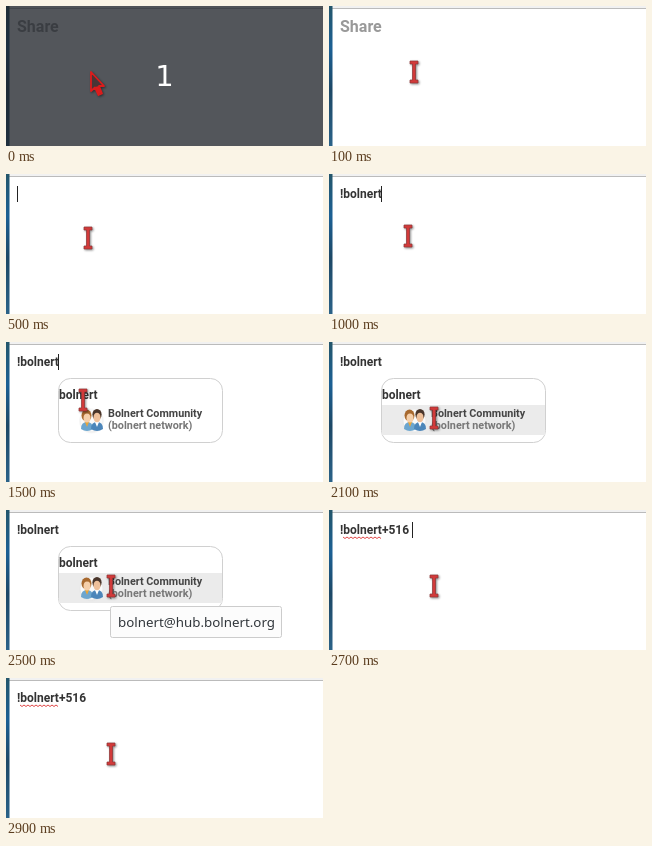
An HTML page for the animation above (3600 ms loop, 317 px wide and 140 px high).

```html
<!DOCTYPE html>
<html lang="en">
<head>
<meta charset="utf-8">
<style>
  html, body { margin: 0; width: 100%; height: 100%; overflow: hidden; background: #fff; }
  svg { display: block; width: 317px; height: 140px; }
  text { font: 700 12px Roboto, sans-serif; fill: #333; }
  #placeholder { font-size: 16px; fill: #999; }
  .result { font-size: 10.8px; fill: #444; }
  .result.sub { fill: #777; }
  #tooltip text { font: 13.33px "Noto Sans", sans-serif; fill: #31363b; }
  #countdown text { font: 29px "DejaVu Sans", sans-serif; fill: #fff; text-anchor: middle; }
  .shadow { filter: drop-shadow(1px 1px 1px #0007); }
</style>
</head>
<body>
<svg viewBox="0 0 317 140">
  <defs>
    <linearGradient id="desktop" x2="0" y2="1">
      <stop stop-color="#24566b"/>
      <stop offset=".3" stop-color="#1c6094"/>
      <stop offset=".6" stop-color="#1d4866"/>
      <stop offset="1" stop-color="#2b6288"/>
    </linearGradient>
    <radialGradient id="glow">
      <stop offset=".75" stop-color="#e4e4e4"/>
      <stop offset="1" stop-color="#e4e4e4" stop-opacity="0"/>
    </radialGradient>
  </defs>

  <rect width="317" height="140" fill="#fff"/>
  <rect width="317" height="2" fill="#f1f1f1"/>
  <rect y="2" width="317" height="1" fill="#bbb"/>
  <rect width="3.5" height="140" fill="url(#desktop)"/>

  <text id="placeholder" x="11" y="25.5">Share</text>
  <text id="typed" x="11" y="24"></text>
  <path id="squiggle" fill="none" stroke="#d33" stroke-width=".9"/>
  <rect id="caret" y="12" width="1" height="16" fill="#222"/>

  <g id="popup">
    <rect x="52.5" y="36.5" width="164" height="64" rx="12" fill="#fff" stroke="#d0d0d0"/>
    <rect id="highlight" x="53" y="63" width="163" height="30" fill="#ebebeb"/>
    <text x="53" y="57">bolnert</text>
    <circle cx="85.5" cy="79" r="13" fill="url(#glow)"/>
    <circle cx="85.5" cy="78.5" r="11" fill="#fafafa"/>
    <g id="avatar">
      <path d="M75 87q0-7 6-7t6 7q-6 4-12 0" fill="#6ca6cf"/>
      <path d="M85 87q0-7 6-7t6 7q-6 4-12 0" fill="#4c86ba"/>
      <path d="M79 80l2 5 2-5z" fill="#e8a63c"/>
      <path d="M89 80l2 5 2-5z" fill="#fff"/>
      <ellipse cx="80.5" cy="73.5" rx="5" ry="6" fill="#a8692e"/>
      <ellipse cx="91" cy="72.5" rx="4.6" ry="5.5" fill="#49352a"/>
      <ellipse cx="81" cy="76" rx="3.5" ry="4.5" fill="#f5cfaa"/>
      <ellipse cx="91" cy="75.5" rx="3.5" ry="4.8" fill="#efc09a"/>
    </g>
    <text class="result" x="102" y="75">Bolnert Community</text>
    <text class="result sub" x="102" y="87">(bolnert network)</text>
  </g>

  <g id="tooltip">
    <rect x="104.5" y="96.5" width="171" height="31" rx="2" fill="#fcfcfc" stroke="#ccc"/>
    <text x="112" y="117">bolnert@hub.bolnert.org</text>
  </g>

  <g id="countdown">
    <rect width="317" height="140" fill="rgb(30,33,40)" fill-opacity=".76"/>
    <text x="158.5" y="80">1</text>
  </g>

  <g id="arrow" class="shadow">
    <path d="M1 1V20L5 16.5 8.5 24 12 22.5 9 15H14Z" fill="#4b3536" stroke="#dc1c1c" stroke-width="1.8" stroke-linejoin="round"/>
    <path d="M5 16L9 15 12 22 8.5 23.5Z" fill="#dc1c1c"/>
  </g>
  <g id="beam" class="shadow">
    <path d="M-4-11H4V-8H1.5V8H4V11H-4V8H-1.5V-8H-4Z" fill="#d23a3a" stroke="#8e3535" stroke-width=".7"/>
  </g>
</svg>
<script>
const LOOP = 3600;
const el = id => document.getElementById(id);
const show = (id, on) => { el(id).style.display = on ? "" : "none"; };
const latest = (steps, t) => steps.findLast(step => step[0] <= t);

// [start, pointer, x, y]
const pointerSteps = [
  [0, "arrow", 84, 65], [100, "beam", 85, 66],
  [500, "beam", 82, 64], [600, "beam", 79, 62],
  [1500, "beam", 77, 58], [1700, "arrow", 80, 65],
  [1800, "arrow", 85, 70], [1900, "arrow", 91, 72],
  [2000, "arrow", 97, 73], [2100, "beam", 105, 76]
];
// [start, text, caret x]
const typedSteps = [
  [0, "", 0], [500, "", 11], [1000, "!bolnert", 52], [1700, "!bolnert", 0],
  [2700, "!bolnert+516", 83], [2900, "!bolnert+516", 0]
];

let wave = "M14 27";
for (let x = 16; x <= 52; x += 2) wave += `L${x} ${x % 4 ? 27 : 28.5}`;
el("squiggle").setAttribute("d", wave);

function draw(now) {
  const t = now % LOOP;
  const within = (from, to) => t >= from && t < to;

  const [, pointer, x, y] = latest(pointerSteps, t);
  show("arrow", pointer === "arrow");
  show("beam", pointer === "beam");
  el(pointer).setAttribute("transform", `translate(${x} ${y})`);

  const [, text, caretX] = latest(typedSteps, t);
  el("typed").textContent = text;
  el("caret").setAttribute("x", caretX);
  show("caret", caretX > 0);

  show("countdown", t < 100);
  show("placeholder", t < 500);
  show("popup", within(1100, 2700));
  show("highlight", within(1700, 2700));
  show("tooltip", within(2500, 2700));
  show("squiggle", t >= 2700);
  requestAnimationFrame(draw);
}
draw(performance.now());
</script>
</body>
</html>
```
